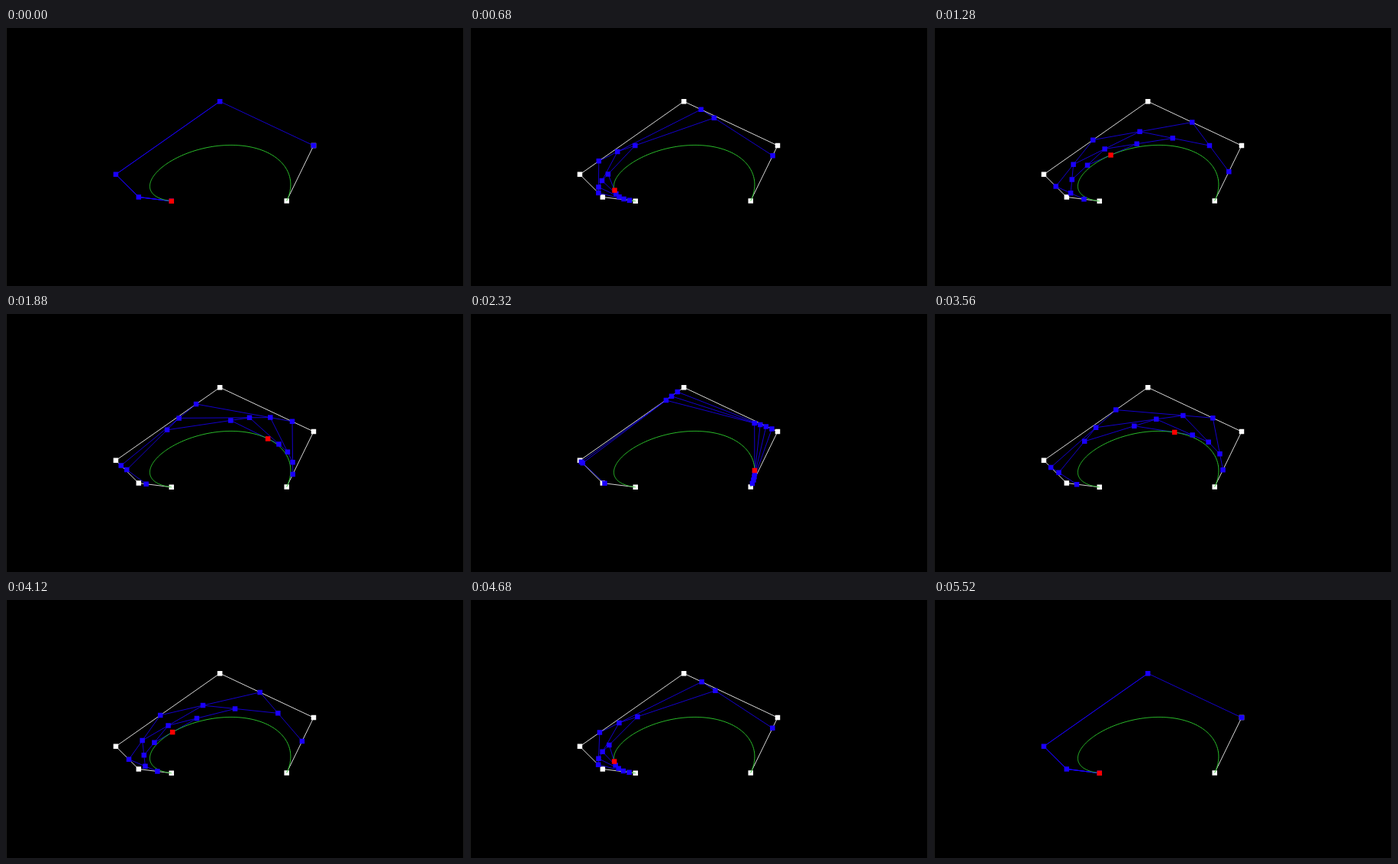
An HTML page with a canvas for the animation above (5560 ms loop, 600 by 338 pixels).

```html
<!DOCTYPE html>
<html lang="en">
<head>
<meta charset="utf-8">
<title>Bézier construction</title>
<style>
html, body { margin: 0; width: 100%; height: 100%; overflow: hidden; background: #000; }
canvas { display: block; }
</style>
</head>
<body>
<canvas id="stage" width="600" height="338"></canvas>
<script>
const ctx = document.getElementById('stage').getContext('2d');
const LOOP = 5560;
const WHITE = '#fff', BLUE = '#1a00ff', GREEN = '#2cc42c', RED = '#f00';
const control = [[216.8, 226.8], [173.8, 221.5], [143.9, 191.8], [280.2, 96.2], [403, 154], [367.7, 226.4]];

// One de Casteljau step
const reduce = (pts, t) => pts.slice(1).map(([x, y], i) =>
  [pts[i][0] + (x - pts[i][0]) * t, pts[i][1] + (y - pts[i][1]) * t]);

function pointAt(t) {
  let pts = control;
  while (pts.length > 1) pts = reduce(pts, t);
  return pts[0];
}

const curve = Array.from({ length: 201 }, (_, i) => pointAt(i / 200));

// Cubic easing from 0 to 1 between two times, with inner control values p and q
function ease(ms, start, end, p, q) {
  const s = Math.min(1, Math.max(0, (ms - start) / (end - start))), r = 1 - s;
  return 3 * s * r * r * p + 3 * s * s * r * q + s ** 3;
}

// Drag forward, hold, drag back
const paramAt = ms => ease(ms, 40, 2600, .102, .878) - ease(ms, 3000, 5160, .427, .717);

// All lines go into one path, so overlapping ones do not grow brighter
function lines(paths, color, width) {
  ctx.beginPath();
  paths.forEach(([first, ...rest]) => {
    ctx.moveTo(...first);
    rest.forEach(p => ctx.lineTo(...p));
  });
  ctx.strokeStyle = color;
  ctx.lineWidth = width;
  ctx.stroke();
}

function squares(pts, color) {
  ctx.beginPath();
  pts.forEach(([x, y]) => ctx.rect(x - 3.25, y - 3.25, 6.5, 6.5));
  ctx.fillStyle = color;
  ctx.fill();
}

function draw(t) {
  ctx.fillStyle = '#000';
  ctx.fillRect(0, 0, 600, 338);
  ctx.fillStyle = '#1c1c1c';
  ctx.fillRect(0, 0, 1, 338);
  ctx.fillRect(599, 0, 1, 338);

  const levels = [];
  let pts = reduce(control, t);
  for (; pts.length > 1; pts = reduce(pts, t)) levels.push(pts);

  // At either end the blue level hides all but one edge of the hull
  const hull = t < .01 ? control.slice(-2) : t > .99 ? control.slice(0, 2) : control;
  lines([hull], WHITE, .85);
  squares(hull, WHITE);
  lines(levels, BLUE, .8);
  lines([curve], GREEN, 1);
  squares(levels.flat(), BLUE);
  squares(pts, RED);
}

function frame() {
  draw(paramAt(performance.now() % LOOP));
  requestAnimationFrame(frame);
}
frame();
</script>
</body>
</html>
```
